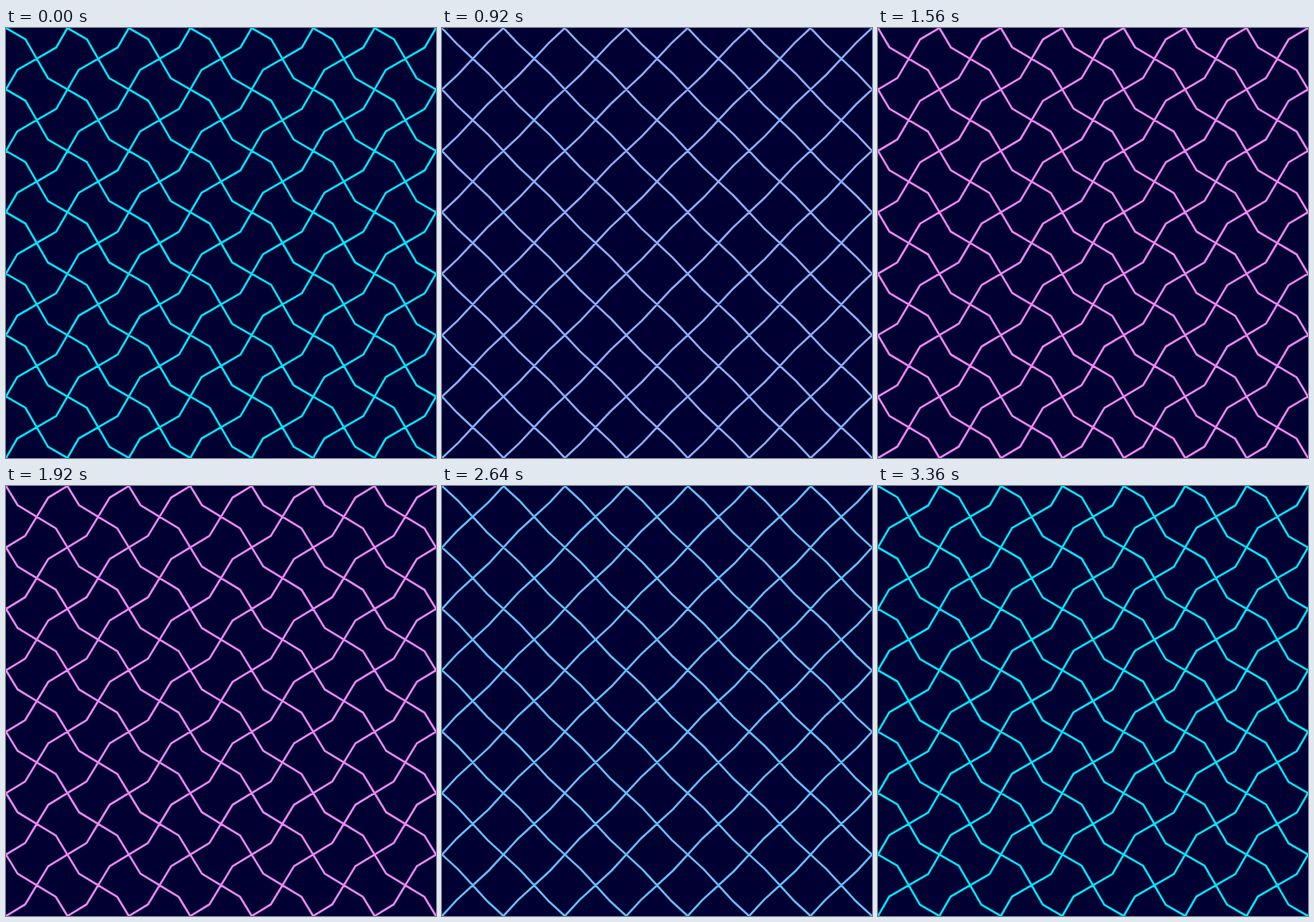
Animation of 540 by 540 pixels, one loop 3.4 s. Source, as an HTML page:

```html
<!DOCTYPE html>
<html lang="en">
<head>
<meta charset="utf-8">
<title>Twisting lattice</title>
<style>
  html, body { margin: 0; width: 100%; height: 100%; overflow: hidden; background: #000033; }
  svg { display: block; width: 100vw; height: 100vh; }
  path { fill: none; stroke-width: 2.6; }
</style>
</head>
<body>
<svg viewBox="0 0 540 540"><path id="lattice"/></svg>
<script>
const LOOP = 3400, STEP = 40;
const HALF = 540 / 14;
const MAX_TWIST = Math.PI / 12;
const START = [0, 229, 255], END = [245, 130, 245];
const lattice = document.getElementById('lattice');

const mix = (a, b, k) => Math.round(a + (b - a) * k);

// One diagonal through the fixed crossings; each segment bends at its middle.
function diagonal(startX, dir, bend) {
  let d = `M${startX * HALF} ${-HALF * 2}`;
  for (let row = -2; row < 16; row++) {
    const x = startX + dir * (row + 2);
    const shift = (row % 2 ? -1 : 1) * bend;
    const midX = (x + dir / 2) * HALF + shift;
    const midY = (row + 0.5) * HALF - dir * shift;
    d += `L${midX.toFixed(3)} ${midY.toFixed(3)}L${(x + dir) * HALF} ${(row + 1) * HALF}`;
  }
  return d;
}

function draw(time) {
  const t = Math.floor((time % LOOP) / STEP) * STEP;
  const swing = Math.cos(2 * Math.PI * t / LOOP);
  const bend = HALF / Math.SQRT2 * Math.tan(MAX_TWIST * swing) / Math.SQRT2;
  let d = '';
  for (let x = -18; x <= 34; x += 2) {
    d += diagonal(x, 1, bend) + diagonal(x, -1, bend);
  }
  lattice.setAttribute('d', d);
  const rgb = START.map((c, i) => mix(c, END[i], (1 - swing) / 2));
  lattice.setAttribute('stroke', `rgb(${rgb})`);
}

const origin = performance.now();
function tick() {
  draw(performance.now() - origin);
  requestAnimationFrame(tick);
}
tick();
</script>
</body>
</html>
```
